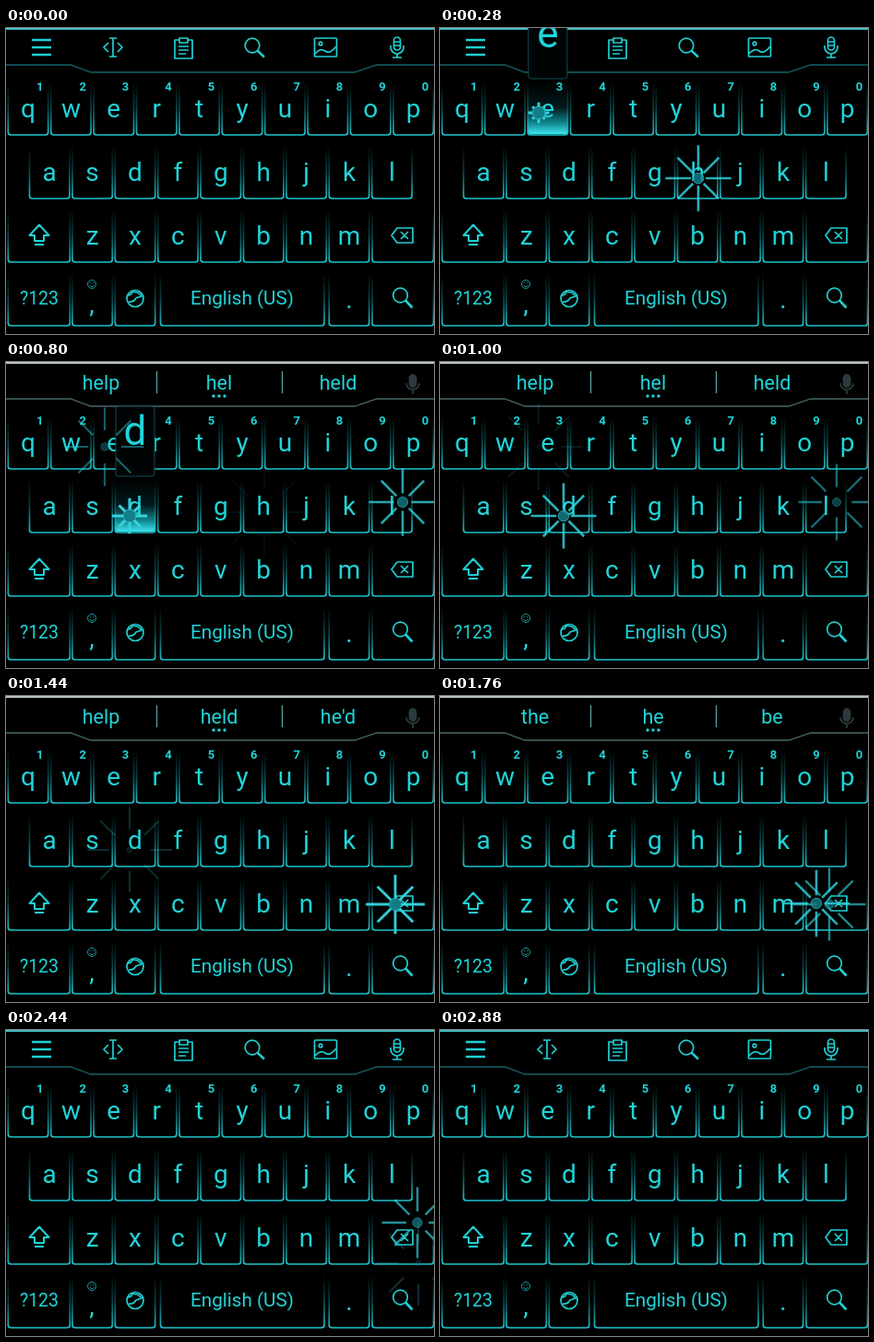
An HTML page that plays this animation: 464x332 px, repeating every 2.92 s.

```html
<!DOCTYPE html>
<html lang="en">
<head>
<meta charset="utf-8">
<title>Neon keyboard</title>
<style>
  html, body { margin: 0; width: 100%; height: 100%; overflow: hidden; background: #000; }
  svg { display: block; width: 464px; height: 332px; font-family: Roboto, sans-serif; }
  text { fill: #20d4d8; text-anchor: middle; }
  .letter { font-size: 28px; }
  .hint { font-size: 13px; font-weight: 700; }
  .word { font-size: 21.5px; }
  .icon { fill: none; stroke: #20d0d4; stroke-width: 1.7; stroke-linejoin: round; }
  .key { fill: none; stroke: url(#edge); stroke-width: 1.7; }
  .off { display: none; }
</style>
</head>
<body>
<svg viewBox="0 0 464 332">
  <defs>
    <linearGradient id="edge" x1="0" y1="0" x2="0" y2="1">
      <stop offset="0" stop-color="#18b4be" stop-opacity="0"/>
      <stop offset=".5" stop-color="#18b4be" stop-opacity=".38"/>
      <stop offset="1" stop-color="#1cc4cc"/>
    </linearGradient>
    <linearGradient id="glow" x1="0" y1="0" x2="0" y2="1">
      <stop offset="0" stop-color="#000"/>
      <stop offset=".5" stop-color="#03191c"/>
      <stop offset=".8" stop-color="#118a92"/>
      <stop offset="1" stop-color="#40e4ee"/>
    </linearGradient>
  </defs>
  <rect width="464" height="332"/>

  <g id="toolbar">
    <path d="M0 1H464" stroke="#44bcc2" stroke-width="2"/>
    <path d="M0 40H70L92 48H378L402 40H464" fill="none" stroke="#17626a" stroke-width="1.3"/>
    <g class="icon">
      <path d="M28 13H49M28 21H49M28 29H49" stroke-width="2.6"/>
      <path d="M112 11H120M112 31H120M116 11V31M111 16L106 21L111 26M121 16L126 21L121 26"/>
      <path d="M188 13H183V33H202V13H197M188 11H197V16H188ZM187 20H198M187 24H198M187 28H195"/>
      <circle cx="267" cy="19" r="7.8"/><path d="M272.5 24.5L280 31.5" stroke-width="2.4"/>
      <rect x="334.5" y="11" width="24" height="20" rx="1"/>
      <path d="M335 28Q341 21 346 25T358 20"/><circle cx="341" cy="17" r="1.8"/>
      <rect x="420.5" y="10" width="7" height="14" rx="3.5"/>
      <path d="M417 19V21A7 7 0 0 0 431 21V19M424 28V32M419 32H429M421 15H427M421 19H427"/>
    </g>
  </g>

  <g id="strip" class="off">
    <path d="M0 1H464" stroke="#b8c2c2" stroke-width="2"/>
    <path d="M0 40H70L92 48H378L402 40H464" fill="none" stroke="#4a686a" stroke-width="1.3"/>
    <path d="M163.5 10V34M299.5 10V34" stroke="#5fa4a6" stroke-width="1.2"/>
    <text class="word" x="103" y="30"></text>
    <text class="word" x="231" y="30"></text>
    <text class="word" x="360" y="30"></text>
    <g fill="#20d4d8"><circle cx="225" cy="37" r="1.7"/><circle cx="231" cy="37" r="1.7"/><circle cx="237" cy="37" r="1.7"/></g>
    <g fill="none" stroke="#2a3a3d" stroke-width="1.8">
      <rect x="437.5" y="14" width="7" height="13" rx="3.5" fill="#2a3a3d"/>
      <path d="M434 23A7 7 0 0 0 448 23M441 30V35"/>
    </g>
  </g>

  <rect id="press" height="57" rx="3" fill="url(#glow)"/>
  <g id="keys"></g>

  <g class="icon">
    <path d="M36 213.5L46.5 225H41V231H31V225H25.5ZM31 235H41" stroke-width="2"/>
    <path d="M418 225L424 217H441V233H424ZM428 221L436 229M436 221L428 229"/>
    <circle cx="140" cy="293.5" r="9"/>
    <path d="M132 290Q136 290 137 286L143 287L147 291L141 293Q138 298 133 297"/>
    <circle cx="427.5" cy="290" r="7.8"/><path d="M433 295.5L440.5 303.5" stroke-width="2.6"/>
    <g stroke-width="1" opacity=".75"><circle cx="93" cy="278" r="4.5"/><path d="M90.5 279Q93 282.5 95.5 279M91.3 276V277M94.7 276V277"/></g>
  </g>

  <g id="popup">
    <rect x="-21" y="-79" width="42" height="76" rx="3" fill="#010405" stroke="#114e56"/>
    <text y="-37" font-size="44"></text>
  </g>
  <g id="bursts"></g>
</svg>
<script>
const LOOP = 2920, STEP = 40, LIFE = 800, LAG = 250;
const $ = id => document.getElementById(id);

function add(parent, tag, attrs, text = '') {
  const el = document.createElementNS('http://www.w3.org/2000/svg', tag);
  for (const k in attrs) el.setAttribute(k, attrs[k]);
  el.textContent = text;
  return parent.appendChild(el);
}

const keys = $('keys');
const label = (cls, x, y, text) => add(keys, 'text', { class: cls, x, y }, text);
function key(x, w, bottom) {
  const d = `M${x} ${bottom - 57}V${bottom - 3}q0 3 3 3H${x + w - 3}q3 0 3 -3V${bottom - 57}`;
  add(keys, 'path', { class: 'key', d });
}
function row(letters, left, bottom) {
  [...letters].forEach((c, i) => {
    const x = left + i * 46.4;
    key(x, 43.4, bottom);
    label('letter', x + 21.7, bottom - 19, c);
    if (bottom < 150) label('hint', x + 34.5, 68, (i + 1) % 10);
  });
}
row('qwertyuiop', 2.3, 116);
row('asdfghjkl', 25.5, 185);
row('zxcvbnm', 71.9, 254);
key(2.3, 67, 254);
key(397, 66.5, 254);
[[2.3, 67], [71.9, 43.4], [118.3, 43.4], [167.5, 177.5], [350.3, 43.4], [397, 66.5]]
  .forEach(([x, w]) => key(x, w, 323));
label('letter', 93, 309, ',');
label('letter', 372, 304, '.');
label('word', 36, 300, '?123').style.fontSize = '19.5px';
label('word', 256, 300, 'English (US)').style.fontSize = '20.7px';

// Touches: time, burst centre, key left and top, letter, text typed afterwards
const taps = [
  [40, 280, 163, 257.5, 127, 'h', 'h'],
  [270, 107, 92, 95.1, 58, 'e', 'he'],
  [520, 430, 152, 396.7, 127, 'l', 'hel'],
  [770, 134, 167, 118.3, 127, 'd', 'held'],
  [1360, 422, 226, 397, 196, '', 'hel'],
  [1500, 408, 225, 397, 196, '', 'he'],
  [1780, 447, 253, 397, 196, '', 'h'],
  [2080, 446, 209, 397, 196, '', '']
].map(([at, x, y, left, top, char, typed]) => {
  const g = add($('bursts'), 'g', { transform: `translate(${x} ${y})` });
  const rays = add(g, 'path', { stroke: '#34d6e0', fill: 'none' });
  const dot = add(g, 'circle', { fill: '#15808a', stroke: '#2fb4be' });
  return { at, left, top, char, typed, g, rays, dot };
});

const words = {
  h: ['he', 'have', 'has'],
  he: ['the', 'he', 'be'],
  hel: ['help', 'hel', 'held'],
  held: ['help', 'held', "he'd"]
};
const slots = $('strip').querySelectorAll('text');
const show = (el, on) => el.classList.toggle('off', !on);

function drawBurst(tap, age) {
  const on = age >= 0 && age < LIFE;
  show(tap.g, on);
  if (!on) return;
  const t = age / LIFE, grow = Math.min(1, (age + 20) / 80);
  const inner = 27 * t, outer = (30 + 19 * t) * grow;
  let d = '';
  for (let i = 0; i < 8; i++) {
    const c = Math.cos(i * Math.PI / 4), s = Math.sin(i * Math.PI / 4);
    const r = i % 2 ? outer * (0.84 + 0.16 * t) : outer;
    d += `M${c * inner} ${s * inner}L${c * r} ${s * r}`;
  }
  tap.rays.setAttribute('d', d);
  tap.rays.setAttribute('stroke-width', 3 - 1.2 * t);
  tap.dot.setAttribute('r', 7 * Math.sqrt(1 - t));
  tap.g.setAttribute('opacity', 1 - t ** 1.4);
}

function render(time) {
  let typed = '', held = null;
  for (const tap of taps) {
    const age = time - tap.at;
    drawBurst(tap, age);
    if (age >= LAG) typed = tap.typed;
    if (age >= 0 && age < (tap.char ? 120 : 70)) held = tap;
  }
  show($('toolbar'), !typed);
  show($('strip'), typed);
  if (typed) slots.forEach((el, i) => el.textContent = words[typed][i]);

  show($('press'), held);
  show($('popup'), held && held.char);
  if (!held) return;
  const w = held.char ? 43.4 : 66.5;
  $('press').setAttribute('x', held.left);
  $('press').setAttribute('y', held.top);
  $('press').setAttribute('width', w);
  $('popup').setAttribute('transform', `translate(${held.left + w / 2} ${held.top})`);
  $('popup').lastElementChild.textContent = held.char;
}

const start = performance.now();
function tick() {
  const time = (performance.now() - start) % LOOP;
  render(Math.floor(time / STEP) * STEP);
  requestAnimationFrame(tick);
}
tick();
</script>
</body>
</html>
```
